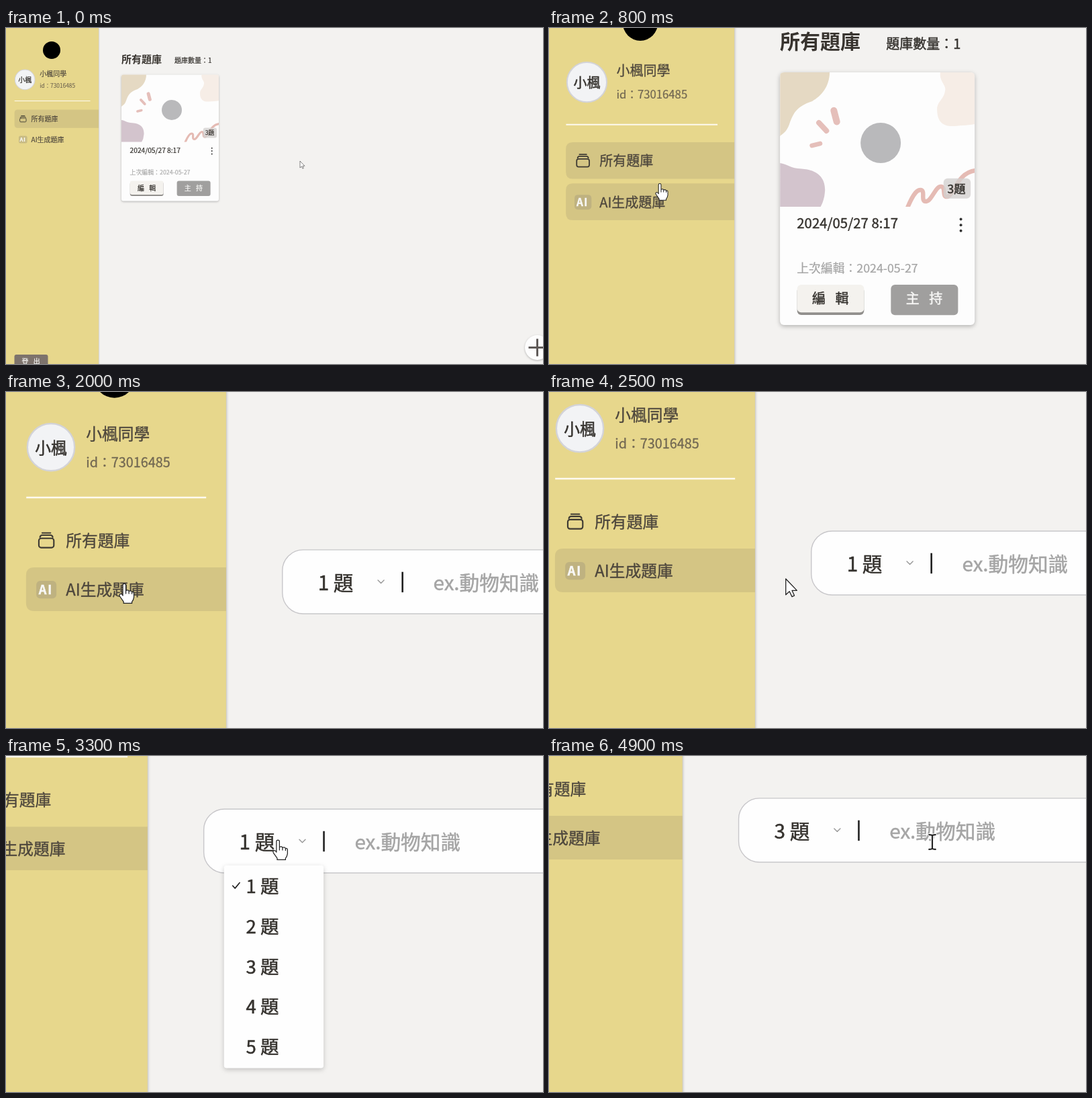
Recreate the animation shown at these times as an HTML page. Size 800 by 500 pixels, loop 5 s.

```html
<!DOCTYPE html>
<html lang="zh-Hant">
<head>
<meta charset="utf-8">
<style>
html, body { margin: 0; width: 100%; height: 100%; overflow: hidden; background: #f3f2f0; }
svg { display: block; width: 100%; height: 100%; }
text { font: 10px "Noto Sans CJK TC", "Noto Sans CJK JP", "Noto Sans CJK", sans-serif; fill: #4d463c; white-space: pre; }
/* a thin outline stands in for the medium weight */
.mid { fill: #35322e; stroke: #35322e; stroke-width: .22; }
.soft { fill: #4d463c; stroke: #4d463c; stroke-width: .14; }
.title { font-size: 15px; font-weight: 700; fill: #38342f; }
.big { font-size: 12.5px; }
.hint { fill: #a5a5a5; stroke: #a5a5a5; }
.btn { letter-spacing: 7.2px; }
.light { fill: #f8f8f6; stroke: #f8f8f6; stroke-width: .22; }
.line { fill: none; stroke-linecap: round; stroke-linejoin: round; }
.cursor { fill: #fff; stroke: #222; stroke-width: .55; stroke-linejoin: round; }
#side { filter: drop-shadow(.6px 0 1px #0005); }
#card, #fab { filter: drop-shadow(0 1px 1.5px #0004); }
#menu { filter: drop-shadow(0 1.2px 1.5px #0003); }
</style>
</head>
<body>
<svg viewBox="0 0 800 500">
<defs><clipPath id="cover"><path d="M172 169.5V72.5q0-3 3-3h139q3 0 3 3v97z"/></clipPath></defs>
<g id="world">
  <rect width="1000" height="700" fill="#f3f2f0"/>

  <g id="list">
    <text class="title" x="172" y="52">所有題庫</text>
    <text class="mid" x="251" y="52">題庫數量：1</text>
    <rect id="card" x="172" y="69.5" width="145" height="188" rx="3" fill="#fdfdfd"/>
    <g clip-path="url(#cover)">
      <path fill="#e5d9c3" d="M172 69H209C209 80 203 87 196 91C184 95 182 100 179 108C177 114 174 115 172 117Z"/>
      <path fill="#f6ede6" d="M291.5 69C290 76 296 79 295 83C294 90 289 91 289 97C289 107 294 110 302 109.5Q311 109 318 108V69Z"/>
      <path fill="#d3c4cd" d="M172 137C177 137.5 180 141 188 141.3C201 142 206 149 205.5 158Q205 165 202 170H172Z"/>
      <path class="line" stroke="#e5bbb4" stroke-width="3.2" d="M267 170C270 163 273 157 276.5 157C281 157 276 166 281 165.5C285 165 288 154 292 154.5C296 155 292 163 297 162C302 160 304 144 318 142.5"/>
      <g class="line" stroke="#e5bfba">
        <path stroke-width="5" d="M212.1 97.9L214.3 106.3"/>
        <path stroke-width="4" d="M201 107L206.6 113"/>
        <path stroke-width="3.4" d="M195.8 124L201.9 122.5"/>
      </g>
      <circle cx="247" cy="122" r="15" fill="#b9b9bb"/>
    </g>
    <rect x="293.8" y="148.4" width="20.2" height="15" rx="3" fill="#d4d1d0" opacity=".78"/>
    <text class="mid" x="296.7" y="159.3" style="font-size:8.7px">3題</text>
    <text class="mid" x="184.6" y="185.7" style="font-size:10.2px">2024/05/27 8:17</text>
    <g fill="#333"><circle cx="306.7" cy="178.8" r="1"/><circle cx="306.7" cy="183.1" r="1"/><circle cx="306.7" cy="187.4" r="1"/></g>
    <text class="hint" x="184.6" y="218.3" style="font-size:8.9px;stroke-width:.12">上次編輯：2024-05-27</text>
    <rect x="184.8" y="229" width="49.8" height="21" rx="3" fill="#918f8c"/>
    <rect x="184.8" y="227.5" width="49.8" height="20.6" rx="3" fill="#f4f2ee"/>
    <text class="mid btn" x="196" y="241.7">編輯</text>
    <rect x="254.6" y="227.5" width="50" height="22.6" rx="3" fill="#a09f9e"/>
    <text class="btn light" x="265.8" y="241.7">主持</text>
    <circle id="fab" cx="791.5" cy="475.5" r="18.5" fill="#fdfdfd"/>
    <path d="M778.5 475.5h26M791.5 462.5v26" stroke="#5f5a58" stroke-width="3"/>
  </g>

  <g id="ask">
    <rect x="173.3" y="141.2" width="500" height="40" rx="13" fill="#fefefe" stroke="#c8c7ca" stroke-width=".6"/>
    <text id="count" class="mid big" x="195.6" y="166.5">1 題</text>
    <path class="line" stroke="#999" stroke-width=".6" d="M233.2 160.2l1.9 1.9 1.9-1.9"/>
    <path stroke="#222" stroke-width="1.1" d="M248.6 155v12.8"/>
    <text class="mid big hint" x="267.9" y="166.5">ex.動物知識</text>
  </g>

  <rect id="side" x="-5" width="143" height="700" fill="#e7d78c"/>
  <circle cx="68" cy="33" r="13"/>
  <circle cx="28.2" cy="76.9" r="14.8" fill="#f2f3f5" stroke="#d3d3d8"/>
  <text class="mid" x="18.2" y="81">小楓</text>
  <text class="soft" x="50.2" y="72.1">小楓同學</text>
  <text x="50.2" y="89.3" style="font-size:8.35px;fill:#716752;stroke:#716752;stroke-width:.12">id：73016485</text>
  <path stroke="#fdfaf0" d="M12.7 108.4H125.5"/>
  <path id="tabAll" fill="#5a5050" opacity=".13" d="M138 121.5H17.6q-5 0-5 5v17.3q0 5 5 5H138z"/>
  <path id="tabAi" fill="#5a5050" opacity=".13" d="M138 152.2H17.6q-5 0-5 5v17.3q0 5 5 5H138z"/>
  <g class="line" stroke="#3e3a33" stroke-width=".9">
    <rect x="20.6" y="134" width="9.4" height="5.8" rx="1.4"/>
    <path d="M21.3 133.2q.3-1.2 1.4-1.2h5.2q1.1 0 1.4 1.2M22.7 130.6h5.2"/>
  </g>
  <text class="soft" x="37.6" y="139.2">所有題庫</text>
  <rect x="19" y="160.6" width="12.6" height="11" rx="2.5" fill="#aaa07c" opacity=".5"/>
  <text class="light" x="20.5" y="169" style="font-size:7.6px;font-weight:700;letter-spacing:.8px">AI</text>
  <text class="soft" x="37.6" y="169.9">AI生成題庫</text>
  <rect x="12.5" y="486" width="50" height="22" rx="3" fill="#7d736c"/>
  <text class="btn light" x="23.6" y="500.2">登出</text>

  <g id="menu">
    <rect x="186" y="176.4" width="62.4" height="127" rx="1.5" fill="#fefefe"/>
    <rect id="hover" x="187.6" width="59" height="25.1" fill="#eff1f3"/>
    <path class="line" stroke="#222" stroke-width=".7" d="M191.4 189.2l1.5 1.6 2.9-3.5"/>
  </g>

  <g id="pointer">
    <path id="arrow" class="cursor" d="M0 0V10L2.3 7.9 3.9 11.2 5.4 10.5 3.9 7.3H7Z"/>
    <path id="hand" class="cursor" transform="translate(0 -.4) scale(.95)" d="M-1 1Q-1 0 0 0T1 1V4.6Q2.5 3.9 3 5Q4.5 4.4 5 5.5Q6.3 5.2 6.3 6.6V9Q6 11 5 12V13H-.5V12L-3 8.4Q-3.6 7.2-2.6 6.9T-1 8ZM1 4.6V6.8M3 5V6.8M5 5.5V7"/>
    <g id="beam" class="line">
      <path id="bar" d="M-2-4.6Q-.4-4.6 0-4Q.4-4.6 2-4.6M0-4V4M-2 4.6Q-.4 4.6 0 4Q.4 4.6 2 4.6"/>
      <use href="#bar" stroke="#fff" stroke-width="1.7"/>
      <use href="#bar" stroke="#222" stroke-width=".9"/>
    </g>
  </g>
</g>
</svg>
<script>
const LOOP = 5000, SWITCH = 2000, OPEN = 3200, PICK = 4150;
const ROW = 25.1, MENU_TOP = 177;
// time, x, y of the pointer in page units
const path = [
  [0, 438, 198], [800, 82.5, 152.7], [1250, 74.2, 162.7], [2080, 74.2, 162.7],
  [2500, 157.3, 171.1], [2900, 219.8, 161], [3300, 219.8, 161],
  [3900, 217.8, 234.6], [4200, 217.8, 234.6], [4780, 294.7, 168.6], [LOOP, 294.7, 168.6]
];
const $ = id => document.getElementById(id);
const show = (id, on) => $(id).style.display = on ? '' : 'none';
const ease = (t, a, b) => {
  const u = Math.min(1, Math.max(0, (t - a) / (b - a)));
  return u * u * (3 - 2 * u);
};

for (let i = 0; i < 5; i++)
  $('menu').insertAdjacentHTML('beforeend',
    `<text class="mid" x="199.8" y="${194 + i * ROW}" style="font-size:11.6px">${i + 1} 題</text>`);

function pointerAt(t) {
  const i = path.findIndex(k => k[0] > t);
  const [a, x0, y0] = path[i - 1], [b, x1, y1] = path[i];
  const p = ease(t, a, b);
  return [x0 + (x1 - x0) * p, y0 + (y1 - y0) * p];
}

function draw(now) {
  const t = now % LOOP;
  const zoom = 1 + 1.376 * ease(t, 0, 1220), pan = ease(t, 2133, 3573);
  const [x, y] = pointerAt(t);
  const asking = t >= SWITCH, open = t >= OPEN && t < PICK;
  $('world').setAttribute('transform',
    `translate(${-129.2 * pan} ${-73.1 * (zoom - 1) - 172 * pan}) scale(${zoom})`);

  show('list', !asking);
  show('ask', asking);
  show('tabAll', !asking);
  const overAi = x < 138 && y > 152 && y < 179.5;
  show('tabAi', asking || overAi);

  show('menu', open);
  const row = Math.floor((y - MENU_TOP) / ROW);
  show('hover', row >= 0);
  $('hover').setAttribute('y', MENU_TOP - .3 + Math.max(0, row) * ROW);
  $('count').textContent = (t < PICK ? 1 : 3) + ' 題';

  const inBox = asking && y > 141 && y < 181 && x > 186;
  const beam = inBox && x > 250;
  const hand = !beam && (overAi || inBox || open);
  show('beam', beam);
  show('hand', hand);
  show('arrow', !beam && !hand);
  $('pointer').setAttribute('transform', `translate(${x} ${y})`);
}

const start = performance.now();
(function tick() {
  draw(Math.max(0, performance.now() - start));
  requestAnimationFrame(tick);
})();
</script>
</body>
</html>
```
